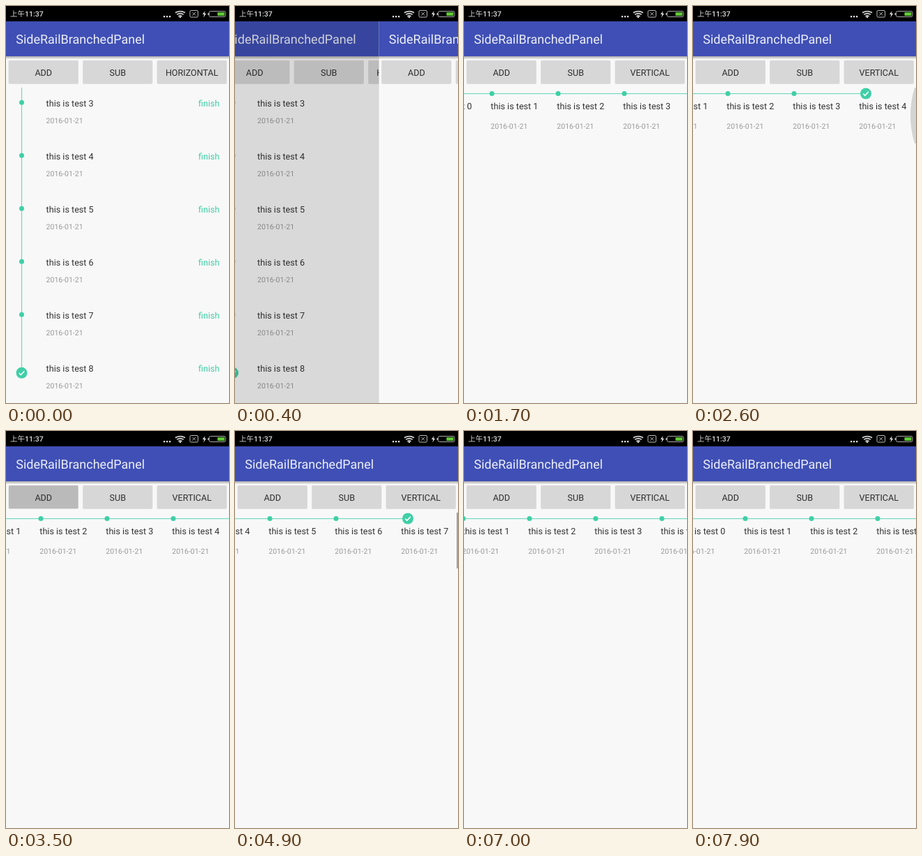
Write an HTML page that moves like this. It is 320 px wide and 569 px high and loops after 8 s.

```html
<!DOCTYPE html>
<html lang="en">
<head>
<meta charset="utf-8">
<title>Timeline list</title>
<style>
  html, body { margin: 0; width: 100%; height: 100%; overflow: hidden; background: #f8f8f8; }
  svg { display: block; width: 320px; height: 569px; font-family: Roboto, sans-serif; text-rendering: geometricPrecision; }
  .title { font-size: 18px; fill: #eceef8; }
  .label { font-size: 12.6px; fill: #2e2e2e; text-anchor: middle; }
  .name { font-size: 12.6px; fill: #333; }
  .date { font-size: 10.5px; fill: #9a9a9a; }
  .done { font-size: 12.6px; fill: #40cfa6; text-anchor: end; }
  .clock { font: 500 10.5px Roboto, "Noto Sans CJK SC", "Noto Sans CJK", sans-serif; fill: #ddd; }
</style>
</head>
<body>
<svg id="stage" viewBox="0 0 320 569">
  <defs>
    <linearGradient id="shade" x2="0" y2="1">
      <stop offset="0" stop-color="#000" stop-opacity=".32"/>
      <stop offset="1" stop-color="#000" stop-opacity="0"/>
    </linearGradient>
  </defs>
</svg>
<script>
const GREEN = '#40cfa6', LINE = '#74dabd';
const LOOP = 8000, STEP = 100, GAP = 95, FIRST = 15, TOP = 22;
const stage = document.getElementById('stage');

function add(parent, tag, attrs = {}, text) {
  const el = document.createElementNS('http://www.w3.org/2000/svg', tag);
  for (const key in attrs) el.setAttribute(key, attrs[key]);
  if (text) el.textContent = text;
  return parent.appendChild(el);
}
const rect = (p, x, y, width, height, fill, more) => add(p, 'rect', { x, y, width, height, fill, ...more });
const label = (p, cls, x, y, text) => add(p, 'text', { class: cls, x, y }, text);
const show = (el, on) => el.setAttribute('visibility', on ? 'visible' : 'hidden');
const move = (el, x) => el.setAttribute('transform', `translate(${x.toFixed(2)} 0)`);

function makePage(lastButton) {
  const root = add(stage, 'g');
  rect(root, 0, TOP, 320, 569 - TOP, '#f8f8f8');
  rect(root, 0, TOP, 320, 50, '#3f4fb5');
  rect(root, 0, 72, 320, 4.5, 'url(#shade)');
  label(root, 'title', 14.2, 54.4, 'SideRailBranchedPanel');
  const buttons = ['ADD', 'SUB', lastButton].map((text, i) => {
    const x = 4 + i * 106.5;
    rect(root, x - .5, 78, 100.5, 34, '#000', { rx: 2, opacity: .1 });
    const face = rect(root, x, 78, 99.5, 33, '#d7d7d7', { rx: 1.5 });
    label(root, 'label', x + 49.75, 99.6, text);
    return face;
  });
  return { root, buttons };
}

function dot(parent, cx, cy) {
  return add(parent, 'circle', { cx, cy, r: 3.5, fill: GREEN });
}
function check(parent, cx, cy) {
  const g = add(parent, 'g', { transform: `translate(${cx} ${cy})` });
  add(g, 'circle', { r: 8, fill: GREEN });
  add(g, 'path', { d: 'M-3.8 .2L-1.2 2.9L3.8 -2.6', fill: 'none', stroke: '#fff', 'stroke-width': 1.6 });
  return g;
}

// Vertical list
const tall = makePage('HORIZONTAL');
rect(tall.root, 21.9, 117, 1.2, 402, LINE);
for (let i = 0; i < 6; i++) {
  const y = 138.2 + i * 76;
  label(tall.root, 'name', 57.6, y + 6.2, 'this is test ' + (i + 3));
  label(tall.root, 'date', 57.6, y + 29.7, '2016-01-21');
  label(tall.root, 'done', 306.5, y + 6.2, 'finish');
  if (i < 5) dot(tall.root, 22.5, y); else check(tall.root, 22.5, y + 7.6);
}
const dim = rect(tall.root, 0, TOP, 320, 569 - TOP, '#000');

// Horizontal list
const wide = makePage('VERTICAL');
const strip = add(wide.root, 'g');
const rail = rect(strip, FIRST, 125, 0, 1.2, LINE);
const items = Array.from({ length: 8 }, (_, i) => {
  const x = FIRST + i * GAP, g = add(strip, 'g');
  label(g, 'name', x - 1.7, 147.8, 'this is test ' + i);
  label(g, 'date', x - 1.7, 176.2, '2016-01-21');
  return { g, dot: dot(g, x, 125.5), check: check(g, x + 8, 125.5) };
});
const glow = add(wide.root, 'path', { fill: '#555' });

// Status bar
const bar = add(stage, 'g');
rect(bar, 0, 0, 320, TOP, '#000');
label(bar, 'clock', 6, 15.2, '上午11:37');
for (let i = 0; i < 3; i++) rect(bar, 226 + i * 4, 14, 2.3, 2.3, '#ddd');
for (const r of [3.2, 6, 8.8]) {
  const w = r * .8, y = 17 - r * .95;
  add(bar, 'path', { d: `M${250 - w} ${y + 1}Q250 ${y - r * .35} ${250 + w} ${y + 1}`, fill: 'none', stroke: '#c8c8c8', 'stroke-width': 1.8 });
}
add(bar, 'circle', { cx: 250, cy: 16, r: 1.3, fill: '#c8c8c8' });
rect(bar, 264, 6.5, 11.5, 9.5, 'none', { rx: 1.5, stroke: '#bbb' });
add(bar, 'path', { d: 'M267.5 9l4.5 4.5m0-4.5l-4.5 4.5', stroke: '#bbb' });
add(bar, 'path', { d: 'M285.5 7l-3.5 5h2.3l-1 4.5l4-5.7h-2.4z', fill: '#ddd' });
rect(bar, 291.5, 7.5, 23.5, 8, 'none', { rx: 2, stroke: '#aaa' });
rect(bar, 289.5, 10, 1.6, 3, '#aaa');
rect(bar, 303.5, 9, 10, 5, '#5fc436');

// Timeline: [start, end, from, to, power]
const scrolls = [
  [1500, 2100, 0, 155, 1.48],
  [4000, 4500, 155, 440, 1.5],
  [6200, 7900, 440, 35, 2.63]
];
const adds = [1000, 1100, 1200, 1300, 1400, 3300, 3700, 3900];
const presses = [[1000, 1500], [3200, 3300], [3500, 3700], [3800, 3900]];
const pulls = [
  [1900, 4], [2000, 14], [2100, 8], [2200, 2], [2400, 0],
  [2600, 8], [2700, 18], [2800, 10], [2900, 2], [3200, 0],
  [4500, 8], [4600, 18], [4700, 0],
  [4900, 2], [5000, 18], [5100, 36], [5200, 18], [5300, 0]
];

const easeOut = (t, start, end, power) =>
  1 - Math.pow(1 - Math.min(1, Math.max(0, (t - start) / (end - start))), power);
const paint = (face, pressed) => face.setAttribute('fill', pressed ? '#bababa' : '#d7d7d7');

function draw(t) {
  const slide = easeOut(t, 300, 900, 2.4);
  move(wide.root, 320 * (1 - slide));
  move(tall.root, -72 * slide);
  dim.setAttribute('opacity', .35 * slide);
  paint(tall.buttons[2], t >= 100 && t < 400);
  paint(wide.buttons[0], presses.some(([a, b]) => t >= a && t < b));

  let scroll = 0;
  for (const [a, b, from, to, power] of scrolls)
    if (t >= a) scroll = from + (to - from) * easeOut(t, a, b, power);
  move(strip, -scroll);

  const count = adds.filter(a => t >= a).length;
  rail.setAttribute('width', Math.max(0, count - 1) * GAP);
  items.forEach((item, i) => {
    item.g.setAttribute('display', i < count ? 'inline' : 'none');
    show(item.dot, i < count - 1);
    show(item.check, i === count - 1);
  });

  let depth = 0;
  for (const [a, d] of pulls) if (t >= a) depth = d;
  const base = Math.min(depth, 2);
  show(glow, depth > 0);
  glow.setAttribute('d', `M320 117H${320 - base}Q${320 - 2 * depth + base} 157 ${320 - base} 197H320z`);
  glow.setAttribute('opacity', .12 + .8 / Math.max(depth, 2));
}

const began = performance.now();
function tick() {
  const t = (performance.now() - began) % LOOP;
  draw(Math.floor(t / STEP) * STEP);
  requestAnimationFrame(tick);
}
tick();
</script>
</body>
</html>
```
